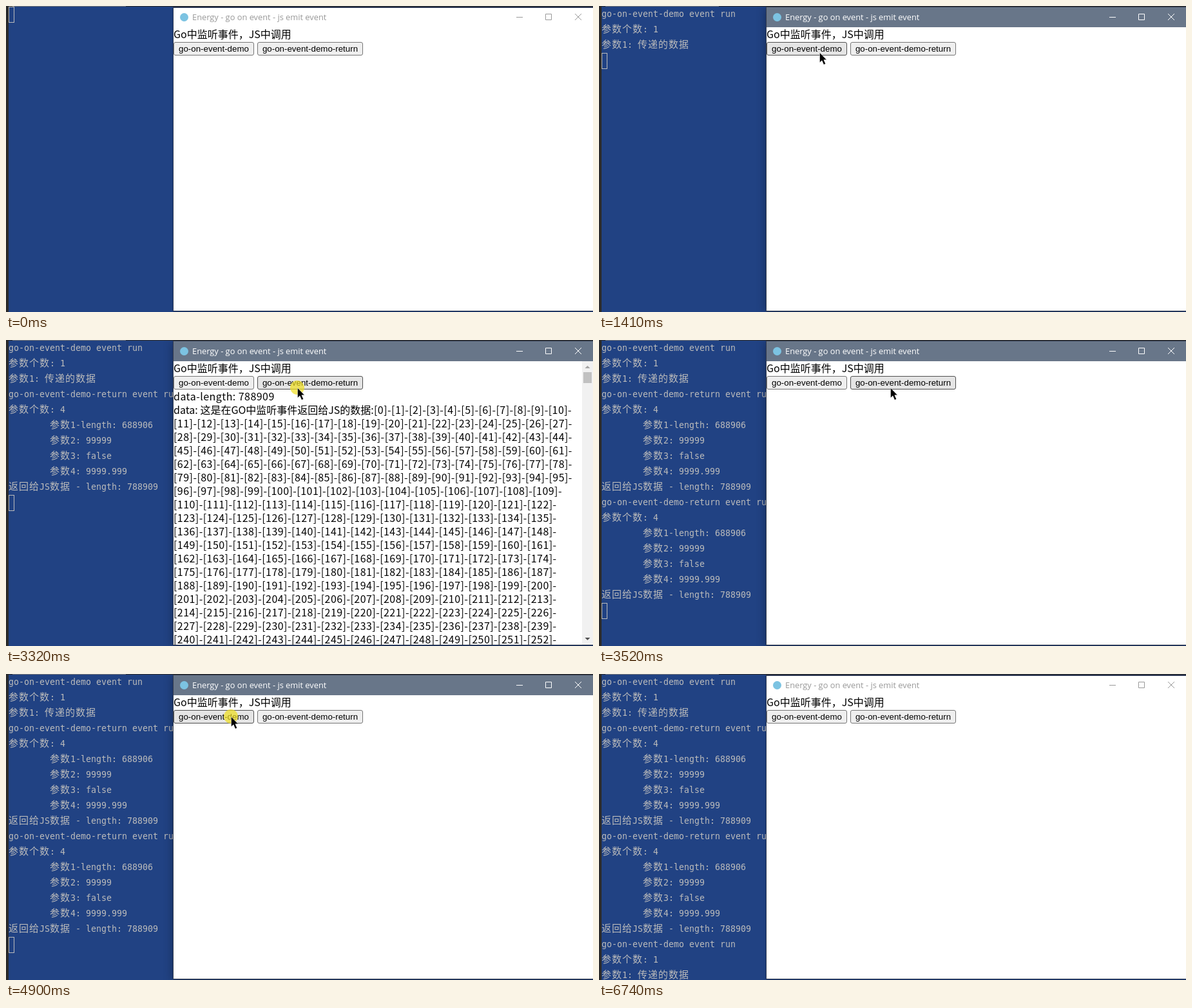
Recreate the animation shown at these times as an HTML page. Size 911 by 476 pixels, loop 6.87 s.

```html
<!DOCTYPE html>
<html lang="zh-CN">
<head>
<meta charset="utf-8">
<title>Energy - go on event - js emit event</title>
<style>
html, body { margin: 0; width: 100%; height: 100%; overflow: hidden; background: #2b2b2b; }
div, svg { position: absolute; box-sizing: border-box; white-space: pre; }
#stage { left: 0; top: 0; width: 911px; height: 476px; overflow: hidden; background: #2b2b2b; }
#console { left: 4px; top: 1px; width: 907px; height: 475px; background: #214283; }
#tab { left: 10px; top: 0; width: 176px; height: 1px; background: #747678; }
.line { left: 0; height: 24px; font: 13.29px/24px "DejaVu Sans Mono", "Noto Sans Mono", monospace; color: #bbb; }
.line i { font: 15px/0 "Noto Sans CJK SC", "Noto Sans CJK", sans-serif; letter-spacing: 1px; }
#caret { left: 0; width: 9px; height: 25px; border: 1px solid #bbb; }
#win { left: 260px; top: 2px; width: 652px; height: 472px; background: #fff;
  box-shadow: 0 0 0 1px rgba(40, 48, 66, .75), 0 1px 6px rgba(0, 0, 0, .2); }
#bar { left: 0; top: 0; width: 652px; height: 31px; background: #fff; color: #999;
  box-shadow: inset 0 1px #2b3450; }
.focus #win { box-shadow: 0 0 0 1px rgba(50, 58, 74, .9), 0 2px 14px rgba(0, 0, 0, .4); }
.focus #bar { background: #687689; color: #fff; box-shadow: none; }
#icon { left: 10px; top: 9px; width: 13px; height: 13px; border-radius: 50%; background: #7cc3e2; }
#title { left: 29px; top: 0; font: 12.83px/31px "Open Sans", "Noto Sans", sans-serif; }
#ctl { left: 525px; top: 7px; fill: none; stroke: currentColor; }
.text { left: 0; height: 21px; color: #000; font: 16px/21px "Noto Sans CJK SC", "Noto Sans CJK", sans-serif; }
.num { letter-spacing: .455px; }
.btn { top: 54px; height: 21px; background: #efefef; border: 1px solid #767676; border-radius: 3px;
  color: #000; font: 13.333px/19px "Liberation Sans", Arial, sans-serif; text-align: center; }
.btn.hover { background: #e5e5e5; border-color: #4f4f4f; }
#data { left: 0; top: 75px; width: 652px; height: 397px; overflow: hidden; }
#scroll { left: 634px; top: 31px; width: 17px; height: 441px; background: #f1f1f1; }
#thumb { left: 2px; top: 17px; width: 13px; height: 17px; background: #c1c1c1; }
#scroll svg { left: 0; top: 0; }
#glow { width: 22px; height: 22px; margin: -11px 0 0 -11px; border-radius: 50%; background: rgba(240, 222, 30, .7); }
#mouse { overflow: visible; }
</style>
</head>
<body>
<div id="stage">
  <div id="tab"></div>
  <div id="console"><div id="caret"></div></div>
  <div id="win">
    <div id="bar">
      <div id="icon"></div>
      <div id="title">Energy - go on event - js emit event</div>
      <svg id="ctl" width="120" height="20">
        <path d="M7 8.5h10M52.5 3.5h9v9h-9z"/>
        <path d="M98 3l10 10M108 3l-10 10"/>
      </svg>
    </div>
    <div class="btn" style="left:0;width:125px">go-on-event-demo</div>
    <div class="btn" style="left:130px;width:164px">go-on-event-demo-return</div>
    <div id="data"></div>
    <div id="scroll">
      <div id="thumb"></div>
      <svg width="17" height="441">
        <path d="M4.5 11l4-4 4 4z" fill="#a3a3a3"/>
        <path d="M4.5 430l4 4 4-4z" fill="#505050"/>
      </svg>
    </div>
  </div>
  <div id="glow"></div>
  <svg id="mouse" width="13" height="21">
    <path d="M.5 .5V16L4 12.8 6.8 19.3 9.6 18 6.9 11.8H11.3Z" fill="#000" stroke="#fff" stroke-width=".5"/>
  </svg>
</div>
<script>
const LOOP = 6870;
const $ = id => document.getElementById(id);
const show = (el, on) => { el.style.visibility = on ? 'visible' : 'hidden'; };
const within = (t, spans) => spans.some(([a, b]) => t >= a && t < b);

// Wraps runs of Chinese so that they get their own font and pitch.
const wrap = s => s.replace(/[\u3000-\u9fff]+/g, '<i>$&</i>');

function addText(parent, cls, top, html, left = 0) {
  const el = document.createElement('div');
  el.className = cls;
  el.style.top = top + 'px';
  el.style.left = left + 'px';
  el.innerHTML = html;
  parent.append(el);
  return el;
}

// Console output
const demo = ['go-on-event-demo event run', '参数个数: 1', '参数1: 传递的数据'];
const tab = ' '.repeat(8);
const withReturn = [
  'go-on-event-demo-return event run', '参数个数: 4',
  tab + '参数1-length: 688906', tab + '参数2: 99999',
  tab + '参数3: false', tab + '参数4: 9999.999',
  '返回给JS数据 - length: 788909'
];
const lines = [...demo, ...withReturn, ...withReturn, ...demo]
  .map((s, i) => addText($('console'), 'line', i * 24, wrap(s)));
const output = [[1070, 3], [2420, 10], [3520, 17], [4970, 20]];

// Page content
addText($('win'), 'text', 31, 'Go中监听事件，JS中调用');
const items = (a, b) => {
  let s = '';
  for (let n = a; n <= b; n++) s += `[${n}]-`;
  return s;
};
addText($('data'), 'text num', 0, 'data-length: 788909');
addText($('data'), 'text', 21, 'data: 这是在GO中监听事件返回给JS的数据:');
addText($('data'), 'text num', 21, items(0, 10), 311);
for (let n = 11, top = 42; n <= 252; top += 21) {
  const count = n < 96 ? 17 : n < 110 ? 14 : 13;
  addText($('data'), 'text num', top, items(n, n + count - 1));
  n += count;
}

// Mouse moves: start, end, steps, from x y, to x y, ease-out power, sag
const moves = [
  [70, 540, 7, 598, 293, 330, 75, 2, 0],
  [680, 740, 2, 330, 74, 330, 72, 1, 0],
  [1410, 2080, 11, 342, 72, 452, 74, 1.3, 5],
  [4250, 4700, 7, 406, 76, 349, 66, 6, 0],
  [5500, 6130, 10, 370, 80, 769, 338, 1.2, 0],
  [6200, 6410, 4, 800, 372, 883, 466, 1, 0]
];
const HIDE = 6480;

function mouseAt(t) {
  const move = moves.filter(m => t >= m[0]).pop();
  if (!move || t >= HIDE) return null;
  const [a, b, n, x0, y0, x1, y1, power, sag] = move;
  const step = Math.min(n - 1, Math.floor((t - a) / (b - a) * (n - 1) + 1e-6));
  const p = step / (n - 1);
  const e = 1 - (1 - p) ** power;
  return [
    Math.round(x0 + (x1 - x0) * e),
    Math.round(y0 + (y1 - y0) * e + sag * Math.sin(Math.PI * p))
  ];
}

const clicks = [[940, 1070], [2150, 2350], [3320, 3520], [4840, 4970]];
const loaded = [[2690, 3390], [3780, 4900]];
const buttons = [...document.querySelectorAll('.btn')];
const edges = [[260, 385], [390, 554]];

function place(el, [x, y]) {
  el.style.left = x + 'px';
  el.style.top = y + 'px';
}

function draw(t) {
  const count = output.reduce((n, [at, total]) => t >= at ? total : n, 0);
  lines.forEach((el, i) => show(el, i < count));
  $('caret').style.top = count * 24 + 'px';
  $('stage').className = t >= 940 && t < 6740 ? 'focus' : '';

  const full = within(t, loaded);
  show($('data'), full);
  show($('scroll'), full);

  const pos = mouseAt(t);
  show($('mouse'), pos);
  show($('glow'), pos && within(t, clicks));
  if (pos) {
    place($('mouse'), pos);
    place($('glow'), pos);
  }
  buttons.forEach((el, i) => {
    const [l, r] = edges[i];
    el.classList.toggle('hover', !!pos && pos[0] >= l && pos[0] < r && pos[1] >= 56 && pos[1] < 77);
  });
}

const start = performance.now();
function tick() {
  draw((performance.now() - start) % LOOP);
  requestAnimationFrame(tick);
}
tick();
</script>
</body>
</html>
```
